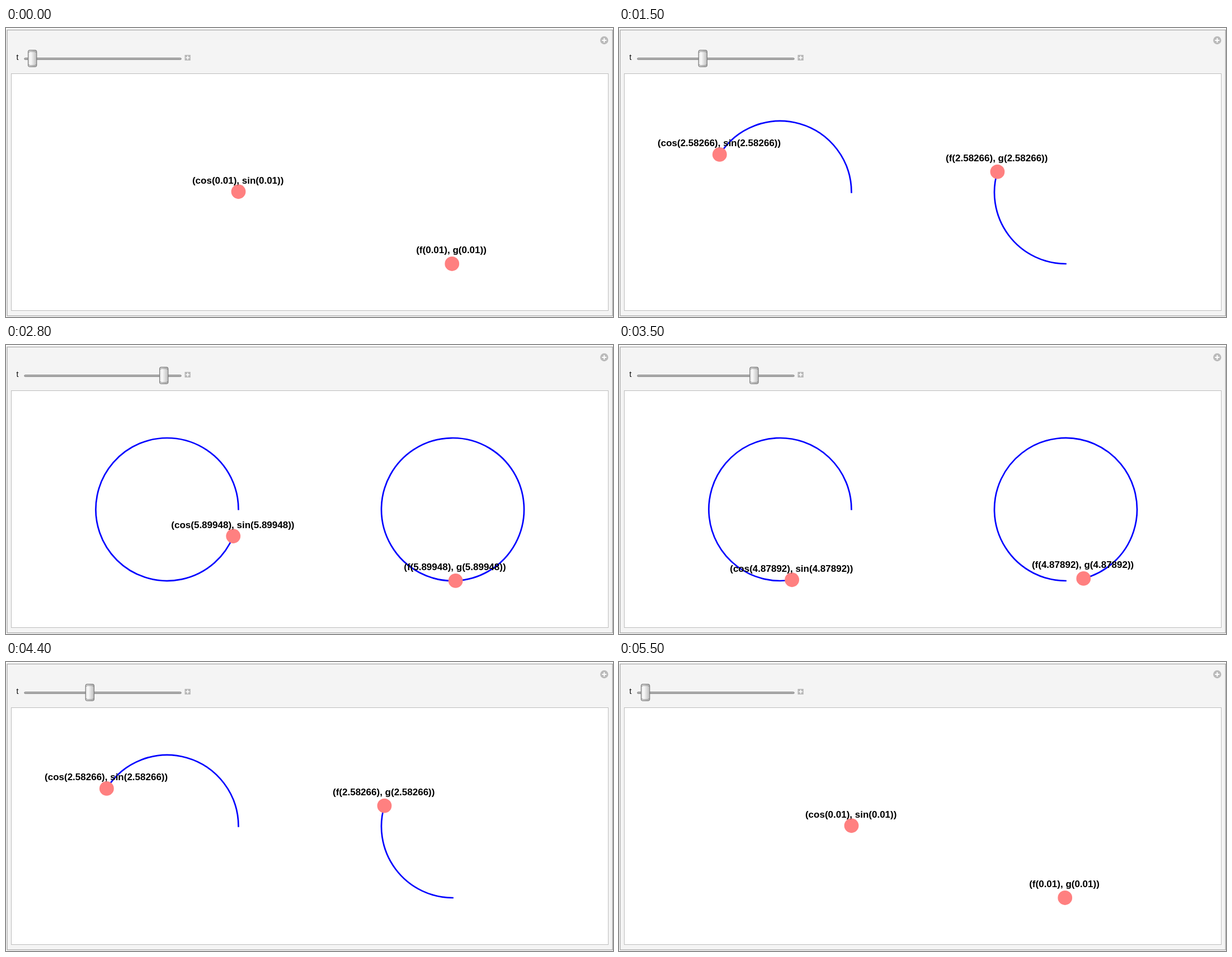
These frames come from a looping animation (1085x516 px, 6 s). An HTML page:

```html
<!DOCTYPE html>
<html lang="en">
<head>
<meta charset="utf-8">
<title>Two circle parametrizations</title>
<style>
  html, body { margin: 0; width: 100%; height: 100%; overflow: hidden; background: #fff; }
  svg { display: block; }
  text { font-family: "Liberation Sans", Arial, sans-serif; }
  .arc { fill: none; stroke: #00f; stroke-width: 2.7; stroke-linecap: square; }
  .dot { fill: #ff8080; }
  .label { font-size: 17px; font-weight: bold; text-anchor: middle; }
</style>
</head>
<body>
<svg width="1085" height="516" viewBox="0 0 1085 516">
  <defs>
    <linearGradient id="metal">
      <stop offset="0" stop-color="#e2e2e2"/>
      <stop offset=".3" stop-color="#fafafa"/>
      <stop offset="1" stop-color="#bcbcbc"/>
    </linearGradient>
  </defs>
  <rect x="2" y="3.5" width="1082.3" height="510.5" fill="#f4f4f4" stroke="#a6a6a6" stroke-width="1.3"/>
  <rect x="9.5" y="81.5" width="1067" height="423" fill="#fff" stroke="#bdbdbd"/>

  <circle cx="1069.3" cy="22" r="7.2" fill="#bababa"/>
  <path d="M1065.3 22h8M1069.3 18v8" stroke="#fff" stroke-width="2"/>
  <rect x="319.5" y="48" width="10.3" height="10" fill="#b8b8b8"/>
  <path d="M321.3 53h6.8M324.7 49.6v6.8" stroke="#fff" stroke-width="1.7"/>

  <text x="18.5" y="57" font-size="14">t</text>
  <rect x="32.8" y="53.5" width="280.4" height="3" rx="1.5" fill="#b4b4b4" stroke="#808080"/>
  <g id="thumb">
    <rect x="-7.6" y="39.6" width="15.2" height="29.6" rx="3.2" fill="url(#metal)" stroke="#777" stroke-width="1.2"/>
    <path d="M-6.6 44Q-6 42 -4 42H4Q6 42 6.6 44M-6.6 65Q-6 67 -4 67H4Q6 67 6.6 65" fill="none" stroke="#858585"/>
  </g>
  <g id="plot"></g>
</svg>
<script>
const R = 127.5, CY = 293.5, LAST = 25, STEP = 100, LOOP = 6000;

// Travelled angle of the second point: [step, radians], joined monotonically.
const knots = [[0, .01], [1, .026], [4, .756], [6, 1.168], [11, 1.864],
               [14, 2.207], [18, 4.535], [20, 6.031], [21, 6.14], [25, 6.273]];
const secant = knots.slice(1).map(([k, a], i) => (a - knots[i][1]) / (k - knots[i][0]));
const slope = knots.map((_, i) => {
  const a = secant[i - 1], b = secant[i];
  return a === undefined ? b : b === undefined ? a : 2 * a * b / (a + b);
});

function warp(k) {
  let i = 0;
  while (i < knots.length - 2 && k > knots[i + 1][0]) i++;
  const [k0, a0] = knots[i], [k1, a1] = knots[i + 1];
  const h = k1 - k0, s = (k - k0) / h, r = 1 - s;
  return r * r * (1 + 2 * s) * a0 + s * s * (3 - 2 * s) * a1
       + h * s * r * (r * slope[i] - s * slope[i + 1]);
}

const param = k => k ? 1.306961 + .2551399 * (k - 6) : .01;

function add(tag, cls) {
  const el = document.createElementNS("http://www.w3.org/2000/svg", tag);
  el.setAttribute("class", cls);
  return document.getElementById("plot").appendChild(el);
}

function set(el, attrs) {
  for (const name in attrs) el.setAttribute(name, attrs[name]);
}

// dir is 1 for counterclockwise and -1 for clockwise travel.
function tracer(cx, start, dir, dx, dy, names) {
  const arc = add("path", "arc"), dot = add("circle", "dot"), label = add("text", "label");
  const at = a => [cx + R * Math.cos(start + dir * a), CY - R * Math.sin(start + dir * a)];
  const from = at(0);
  return (angle, t) => {
    const [x, y] = at(angle), n = String(+t.toPrecision(6));
    set(arc, { d: `M${from}A${R} ${R} 0 ${+(angle > Math.PI)} ${+(dir < 0)} ${x} ${y}` });
    set(dot, { cx: x, cy: y, r: 12.9 });
    set(label, { x: x + dx, y: y + dy });
    label.textContent = `(${names[0]}(${n}), ${names[1]}(${n}))`;
  };
}

const left = tracer(288, 0, 1, -.8, -14.5, ["cos", "sin"]);
const right = tracer(798.5, -Math.PI / 2, -1, -1.2, -18.5, ["f", "g"]);
const thumb = document.getElementById("thumb");

let shown = -1;
function draw(ms) {
  const n = Math.floor(ms % LOOP / STEP);
  const k = Math.max(0, Math.min(n - 4, 55 - n, LAST));
  if (k === shown) return;
  shown = k;
  const t = param(k);
  set(thumb, { transform: `translate(${47.2 + 39.9 * (t - .01)} 0)` });
  left(t, t);
  right(warp(k), t);
}

const begin = performance.now();
function tick(now) {
  draw(Math.max(0, now - begin));
  requestAnimationFrame(tick);
}
draw(0);
requestAnimationFrame(tick);
</script>
</body>
</html>
```
